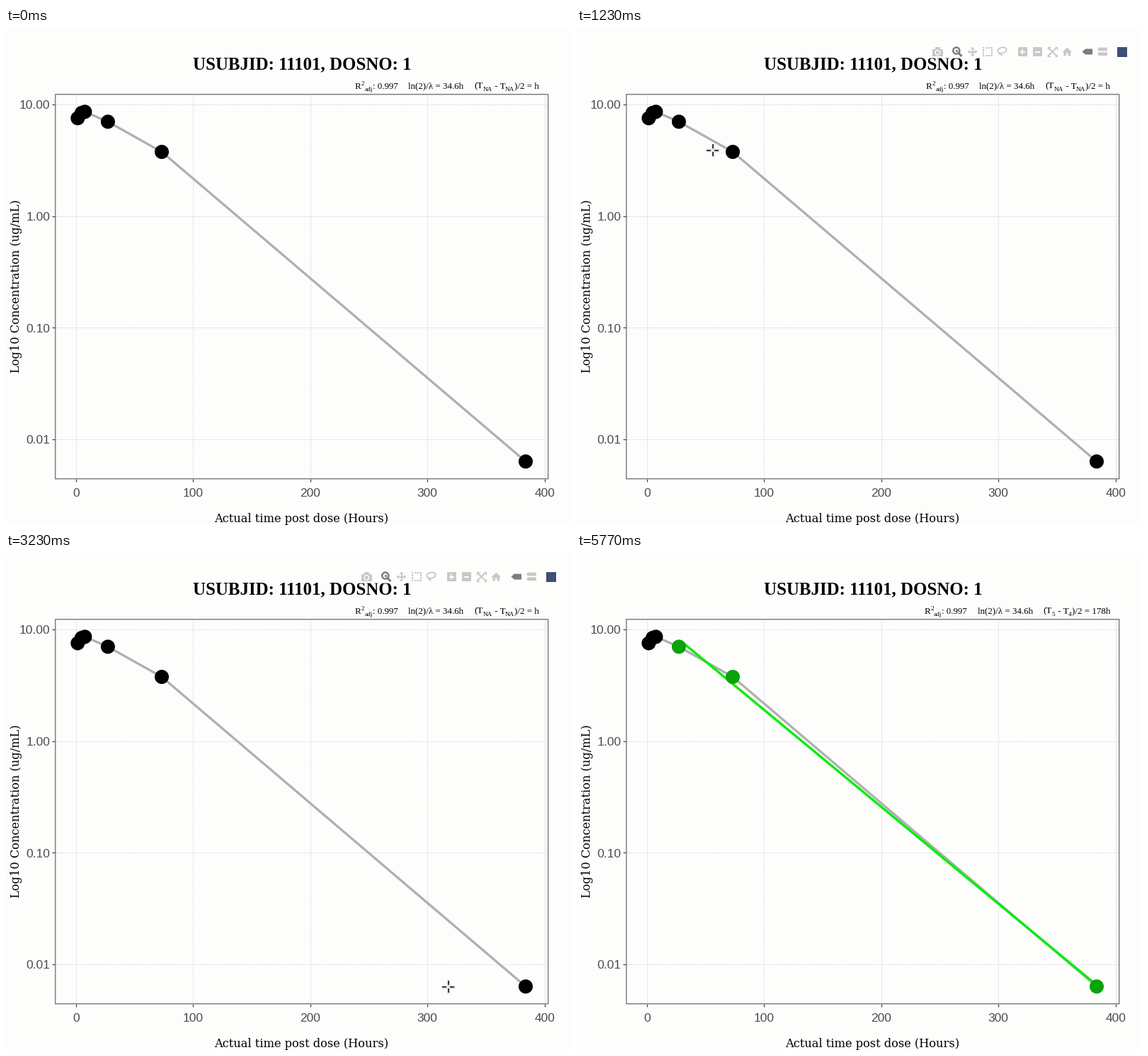
A matplotlib script for the animation above (8600 ms loop, 798 by 702 pixels).

```python
import matplotlib.pyplot as plt
from matplotlib.animation import FuncAnimation
from matplotlib.patches import Circle, Ellipse, Polygon, Rectangle

W, H, DPI = 798, 702, 96
LOOP, STEP = 8600, 40
PT = 72 / DPI  # points per pixel

SERIF, SANS, LABEL = "Liberation Serif", "Liberation Sans", "DejaVu Serif"
PAPER, BLACK, GRID = "#fdfdfc", "#000000", "#dcdce4"
LIGHT, DARK, BADGE = "#c8c8c6", "#7c7c7c", "#3f4f75"
POINT_GREEN, LINE_GREEN = "#08a308", "#0cec0c"

fig = plt.figure(figsize=(W / DPI, H / DPI), dpi=DPI, facecolor=PAPER)
ax = fig.add_axes([0, 0, 1, 1])
ax.set_xlim(0, W)
ax.set_ylim(H, 0)
ax.axis("off")


def text(x, y, s, px, font=SERIF, color=BLACK, ha="left", va="baseline", z=5, **kw):
    return ax.text(x, y, s, fontsize=px * PT, family=font, color=color,
                   ha=ha, va=va, zorder=z, **kw)


def line(xs, ys, color, px, z, cap="butt", **kw):
    return ax.plot(xs, ys, color=color, lw=px * PT, zorder=z,
                   solid_capstyle=cap, **kw)[0]


def shape(patch, z):
    patch.set_zorder(z)
    return ax.add_patch(patch)


# ---------------------------------------------------------------- plot
LEFT, TOP, RIGHT, BOTTOM = 69.7, 93.7, 765.7, 636.7

for i in range(5):
    x = 99 + 165.4 * i
    line([x, x], [TOP, BOTTOM], GRID, 1, 1, ls=(0, (2, 1)))
    line([x, x], [BOTTOM, BOTTOM + 4.5], "#444444", 1.3, 2)
    text(x, 662.5, str(100 * i), 17.33, SANS, "#4d4d4d", ha="center")
for i, label in enumerate(["10.00", "1.00", "0.10", "0.01"]):
    y = 108.3 + 157.5 * i
    line([LEFT, RIGHT], [y, y], GRID, 1, 1, ls=(0, (2, 1)))
    line([LEFT - 4.5, LEFT], [y, y], "#444444", 1.3, 2)
    text(62.5, y + 6.2, label, 17.33, SANS, "#4d4d4d", ha="right")
shape(Rectangle((LEFT, TOP), RIGHT - LEFT, BOTTOM - TOP, fill=False,
                ec="#7f7f7f", lw=1.5 * PT, snap=False), 2)

text(418, 58, "USUBJID: 11101, DOSNO: 1", 24.9, ha="center", weight="bold")
text(417.5, 697.6, "Actual time post dose (Hours)", 16.2, LABEL, ha="center")
text(14.5, 365, "Log10 Concentration (ug/mL)", 16.2, LABEL,
     ha="center", va="center", rotation=90)

points = [(101.3, 127.4), (106.9, 119.9), (111.4, 118.4),
          (143.9, 132.4), (220, 175), (734, 612.3)]
line(*zip(*points), "#b0b0b0", 3.3, 3, solid_joinstyle="round")
fit = line([150.3, 734], [127.3, 610.3], LINE_GREEN, 3.4, 3.5)
dots = [shape(Circle(p, 10, fc=BLACK, ec="none"), 4) for p in points]


def rich_text(x, runs):
    """Lay out runs from x; a leading ^ raises a run and _ lowers it."""
    parts = []
    for run in runs:
        if run[0] in "^_":
            dy, px, run = (-5 if run[0] == "^" else 3), 9.1, run[1:]
        else:
            dy, px = 0, 13
        parts.append(text(x, 85.7 + dy, run, px))
        x += parts[-1].get_window_extent().width
    return parts


def caption(x, *half_life):
    return (rich_text(x, ["R", "^2", "_adj", ": 0.997"])
            + rich_text(x + 75, ["ln(2)/λ = 34.6h"])
            + rich_text(x + 168, half_life))


caption_before = caption(493, "(T", "_NA", " - T", "_NA", ")/2 = h")
caption_after = caption(490.5, "(T", "_5", " - T", "_4", ")/2 = 178h")

# ---------------------------------------------------------------- toolbar
toolbar = []  # (artist, full opacity)


def tool(artist, opacity=1):
    toolbar.append((artist, opacity))


def block(x0, y0, x1, y1, color=LIGHT, opacity=1, z=7):
    tool(shape(Rectangle((x0, y0), x1 - x0, y1 - y0, fc=color, ec="none"), z), opacity)


def poly(pts, color=LIGHT):
    tool(shape(Polygon(pts, fc=color, ec="none"), 7))


def stroke(xs, ys, color=LIGHT, px=2, z=7):
    tool(line(xs, ys, color, px, z))


block(498, 23, 783, 43, "#ffffff", 0.6, z=6)

# camera
block(502, 29.5, 516.5, 40)
block(506, 27, 512.5, 30)
tool(shape(Circle((509.2, 34.7), 3.3, fc=LIGHT, ec=PAPER, lw=1.4 * PT), 8))
# magnifier
tool(shape(Circle((535.8, 32), 4.6, fc="none", ec=DARK, lw=2.4 * PT), 7))
stroke([539, 543.5], [35.5, 40], DARK, 3)
stroke([533.5, 538], [32, 32], DARK, 1.4)
stroke([535.8, 535.8], [29.8, 34.2], DARK, 1.4)
# four-way arrows
stroke([554, 563], [33.5, 33.5])
stroke([558.5, 558.5], [29, 38])
for dx, dy in [(1, 0), (-1, 0), (0, 1), (0, -1)]:
    tip, base = 7, 4
    poly([(558.5 + tip * dx, 33.5 + tip * dy),
          (558.5 + base * dx + 3 * dy, 33.5 + base * dy + 3 * dx),
          (558.5 + base * dx - 3 * dy, 33.5 + base * dy - 3 * dx)])
# dashed box
for k in range(4):
    a = 3.7 * k
    for edge in (27.7, 39.3):
        block(573 + a, edge - 1, 575.4 + a, edge + 1)
    for edge in (574, 585.5):
        block(edge - 1, 26.7 + a, edge + 1, 29.1 + a)
# lasso
tool(shape(Ellipse((600.5, 31.5), 12.5, 8, angle=-12, fc="none", ec=LIGHT,
                   lw=1.8 * PT), 7))
stroke([596, 597.5, 599.5, 600], [35, 37.5, 37, 40], px=1.6)
# plus and minus
for x in (622.5, 643.5):
    block(x, 27, x + 13, 40)
    stroke([x + 3, x + 10], [33.5, 33.5], PAPER, 2, 8)
stroke([629, 629], [30, 37], PAPER, 2, 8)
# outward arrows
for sx in (-1, 1):
    for sy in (-1, 1):
        stroke([671.5, 671.5 + 6 * sx], [33.5, 33.5 + 6 * sy], px=2)
        stroke([671.5 + 3 * sx, 671.5 + 6.3 * sx, 671.5 + 6.3 * sx],
               [33.5 + 6.3 * sy, 33.5 + 6.3 * sy, 33.5 + 3 * sy], px=1.4)
# house
poly([(685.5, 34), (692.3, 27.5), (699, 34), (697, 34), (697, 39.5), (693.8, 39.5),
      (693.8, 35.5), (690.8, 35.5), (690.8, 39.5), (687.5, 39.5), (687.5, 34)])
# tags
poly([(713.5, 33.5), (718, 29.5), (728, 29.5), (728, 37.5), (718, 37.5)], DARK)
for y in (30, 36.7):
    poly([(735, y), (737, y - 2.4), (749, y - 2.4), (749, y + 2.4), (737, y + 2.4)])
block(762.5, 26.5, 776.5, 40.5, BADGE)


# ---------------------------------------------------------------- hover labels
def hover_label(tip, y, side, width, rows):
    """Black label beside a point; side is +1 to its right, -1 to its left."""
    near, far = tip + 6 * side, tip + (6 + width) * side
    outline = [(tip, y), (near, y - 6), (near, y - 26.5), (far, y - 26.5),
               (far, y + 26.5), (near, y + 26.5), (near, y + 6)]
    parts = [shape(Polygon(outline, fc=BLACK, ec="#ffffff", lw=PT), 10)]
    for dy, row in zip((-4, 18.5), rows):
        parts.append(text(near + 2.5 * side, y + dy, row, 17.33, color="#fafafa",
                          ha="left" if side > 0 else "right", z=11))
    return parts


label_early = hover_label(150, 132, 1, 99, ["Data Point: 4", "(27 , 7)"])
label_late = hover_label(727, 612, -1, 105.5, ["Data Point: 6", "(380 , 0.0063)"])

# ---------------------------------------------------------------- crosshair
ARMS = [(1, 0), (-1, 0), (0, 1), (0, -1)]
halo = [line([], [], "#e4e4e4", 4.5, 12, cap="projecting") for _ in ARMS]
arms = [line([], [], BLACK, 1.5, 13) for _ in ARMS]

PATH = [(30, 320, 690), (830, 224.5, 194.5), (900, 224.5, 194.5),
        (1730, 130.5, 131.5), (1770, 130.5, 131.5), (1950, 143, 134),
        (2770, 143, 134), (3230, 624.5, 612.5), (3630, 722, 614.5),
        (3970, 734.5, 614.5)]


def ramp(t, start, end):
    u = min(max((t - start) / (end - start), 0), 1)
    return u * u * (3 - 2 * u)


def cursor_at(t):
    _, x, y = PATH[0]
    for (t0, x0, y0), (t1, x1, y1) in zip(PATH, PATH[1:]):
        if t >= t0:
            u = ramp(t, t0, t1)
            x, y = x0 + (x1 - x0) * u, y0 + (y1 - y0) * u
    return x, y


def show(artists, on):
    for artist in artists:
        artist.set_visible(on)


def draw(i):
    t = i * STEP + 30 if i else 0

    opacity = ramp(t, 30, 330) * (1 - ramp(t, 4970, 5230))
    for artist, full in toolbar:
        artist.set_alpha(full * opacity)
        artist.set_visible(opacity > 0)

    x, y = cursor_at(t)
    inside = LEFT < x < RIGHT and TOP < y < BOTTOM
    for group, inner, outer in ((halo, 3, 7), (arms, 2.5, 8.5)):
        show(group, inside and t < 4900)
        for arm, (dx, dy) in zip(group, ARMS):
            arm.set_data([x + inner * dx, x + outer * dx],
                         [y + inner * dy, y + outer * dy])

    show(label_early, 1830 <= t < 2800)
    show(label_late, 3690 <= t < 4900)

    chosen = t >= 5470
    show(caption_before, not chosen)
    show(caption_after, chosen)
    for dot in dots[3:]:
        dot.set_facecolor(POINT_GREEN if chosen else BLACK)
    fit.set_visible(t >= 5770)
    return []


animation = FuncAnimation(fig, draw, frames=LOOP // STEP, interval=STEP,
                          init_func=lambda: draw(0), repeat=True, repeat_delay=0)
plt.show()
```
